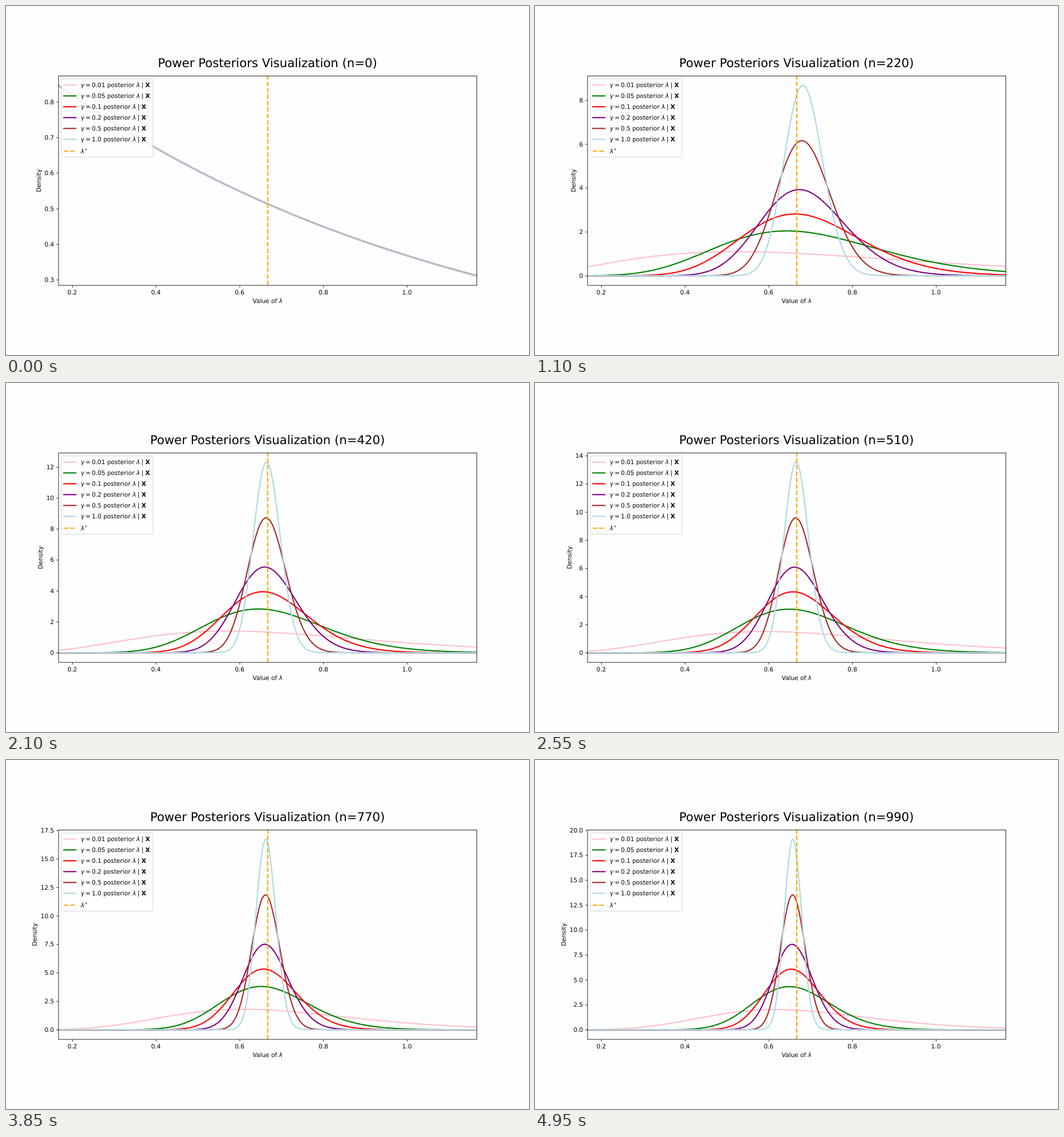
An HTML page for the animation above (5000 ms loop, 917 by 611 pixels).

```html
<!DOCTYPE html>
<html lang="en">
<head>
<meta charset="utf-8">
<title>Power Posteriors Visualization</title>
<style>
  html, body { margin: 0; width: 100%; height: 100%; overflow: hidden; background: #fefefe; }
  svg { display: block; width: 917px; height: 611px; }
  text { font-family: "DejaVu Sans", sans-serif; font-size: 10.61px; text-rendering: geometricPrecision; white-space: pre; }
  .i { font-style: italic; }
  .b { font-weight: bold; }
  .mid { text-anchor: middle; }
  .end { text-anchor: end; }
  .axis { stroke: #000; stroke-width: .85; fill: none; }
  .line { stroke-width: 2.12; fill: none; stroke-linejoin: round; }
</style>
</head>
<body>
<svg id="stage" viewBox="0 0 917 611" xmlns="http://www.w3.org/2000/svg">
  <defs><clipPath id="plot"><rect x="91.7" y="122.2" width="733.6" height="366.6"/></clipPath></defs>
  <text id="title" class="mid" x="458.5" y="107" style="font-size:21.22px"></text>
  <g id="curves" clip-path="url(#plot)"></g>
  <path class="line" d="M458.9 488.8V122.2" stroke="#ffa500" stroke-dasharray="7.85 3.4"/>
  <rect class="axis" x="92.1" y="122.6" width="733.5" height="366.5"/>
  <g id="xticks"></g>
  <g id="yticks"></g>
  <text class="mid" x="458.7" y="520.4">Value of <tspan class="i">λ</tspan></text>
  <text id="ylabel" class="mid">Density</text>
  <g id="legend">
    <rect x="97.3" y="127.7" width="160.5" height="136.8" rx="2.1" fill="#fff" stroke="#ccc" stroke-width="1" opacity=".8"/>
  </g>
</svg>
<script>
const L = 91.7, T = 122.2, W = 733.6, H = 366.6, B = T + H;
const EM = 10.61, SNAP = 0.38;
const TRUE_RATE = 2 / 3, X_MIN = TRUE_RATE - 0.5, SAMPLES = 600;
const STEP_MS = 50, STEPS = 100;

const series = [
  ["0.01", "#ffc0cb"], ["0.05", "#008000"], ["0.1", "#ff0000"],
  ["0.2", "#800080"], ["0.5", "#a52a2a"], ["1.0", "#add8e6"]
];
// running sum of the observations after n draws
const sums = [[0, 0], [140, 196.1], [220, 321.7], [420, 631.2], [610, 914.1], [770, 1161.5], [990, 1503.8]];

const $ = id => document.getElementById(id);

function add(parent, tag, attrs, text) {
  const el = document.createElementNS("http://www.w3.org/2000/svg", tag);
  for (const k in attrs) el.setAttribute(k, attrs[k]);
  if (text !== undefined) el.textContent = text;
  parent.appendChild(el);
  return el;
}

function sumAt(n) {
  const i = Math.max(1, sums.findIndex(p => p[0] >= n));
  const [n0, s0] = sums[i - 1], [n1, s1] = sums[i];
  return s0 + (s1 - s0) * (n - n0) / (n1 - n0);
}

function logGamma(a) {
  let shift = 0;
  while (a < 10) shift += Math.log(a++);
  return (a - 0.5) * Math.log(a) - a + Math.log(2 * Math.PI) / 2
    + 1 / (12 * a) - 1 / (360 * a ** 3) - shift;
}

// Gamma(1 + g n, 1 + g sum) density over the visible range
function posterior(g, n, sum) {
  const a = 1 + g * n, b = 1 + g * sum;
  const c = a * Math.log(b) - logGamma(a);
  return Array.from({ length: SAMPLES + 1 }, (_, i) => {
    const x = X_MIN + i / SAMPLES;
    return Math.exp(c + (a - 1) * Math.log(x) - b * x);
  });
}

function tickStep(range) {
  const raw = range / 9, p = 10 ** Math.floor(Math.log10(raw));
  return p * [1, 2, 2.5, 5, 10].find(m => m * p >= raw - 1e-9);
}

function decimals(step) {
  let d = 0;
  while (Math.abs(step * 10 ** d - Math.round(step * 10 ** d)) > 1e-6) d++;
  return d;
}

function textWidth(s) {
  return [...s].reduce((w, c) => w + (c === "." ? 0.318 : 0.636), 0) * EM;
}

const paths = series.map(([, stroke]) => add($("curves"), "path", { class: "line", stroke, "stroke-linecap": "square" }));

for (let k = 1; k <= 5; k++) {
  const v = k / 5, x = L + (v - X_MIN) * W;
  add($("xticks"), "path", { class: "axis", d: `M${x + SNAP} ${B + SNAP}v3.7` });
  add($("xticks"), "text", { class: "mid", x, y: 505 }, v.toFixed(1));
}

series.forEach(([g, stroke], i) => {
  const box = $("legend"), y = 138.4 + 19 * i, base = y + 3.6;
  const put = (x, s, cls = "") => add(box, "text", { x, y: base, class: cls }, s);
  const dx = textWidth(g) - textWidth("0.01");
  add(box, "path", { class: "line", stroke, d: `M101.3 ${y}h21.2`, "stroke-linecap": "square" });
  put(131.1, "γ", "i");
  put(139.5, "=");
  put(150.4, g + " posterior ");
  put(228.5 + dx, "λ", "i");
  put(237.6 + dx, "|");
  put(244.2 + dx, "X", "b");
});
add($("legend"), "path", { class: "line", stroke: "#ffa500", d: "M101.3 254.3h21.2", "stroke-dasharray": "7.85 3.4" });
add($("legend"), "text", { x: 131.1, y: 258, class: "i" }, "λ");
add($("legend"), "text", { x: 138.4, y: 254.5, style: "font-size:7.43px" }, "*");

function draw(step) {
  const n = step * 10, sum = sumAt(n);
  const data = series.map(([g]) => posterior(+g, n, sum));
  const all = data.flat(), top = Math.max(...all), low = Math.min(...all);
  const pad = (top - low) * 0.05, yMin = low - pad, yMax = top + pad;
  const yPos = v => B - (v - yMin) / (yMax - yMin) * H;

  data.forEach((d, i) => paths[i].setAttribute("d", "M" + d.map((v, k) =>
    (L + k / SAMPLES * W).toFixed(2) + " " + yPos(v).toFixed(2)).join("L")));

  const gap = tickStep(yMax - yMin), dec = decimals(gap);
  let widest = 0;
  $("yticks").replaceChildren();
  for (let k = Math.ceil(yMin / gap); k * gap <= yMax; k++) {
    const y = yPos(k * gap), s = (k * gap).toFixed(dec);
    widest = Math.max(widest, textWidth(s));
    add($("yticks"), "path", { class: "axis", d: `M${L + SNAP} ${y + SNAP}h-3.7` });
    add($("yticks"), "text", { class: "end", x: L - 7.4, y: y + 3.9 }, s);
  }
  $("ylabel").setAttribute("transform", `translate(${77.5 - widest} 305.7) rotate(-90)`);
  $("title").textContent = `Power Posteriors Visualization (n=${n})`;
}

const start = performance.now();
let shown = 0;
draw(0);

function tick() {
  const step = Math.floor((performance.now() - start) / STEP_MS) % STEPS;
  if (step !== shown) draw(shown = step);
  requestAnimationFrame(tick);
}
requestAnimationFrame(tick);
</script>
</body>
</html>
```
